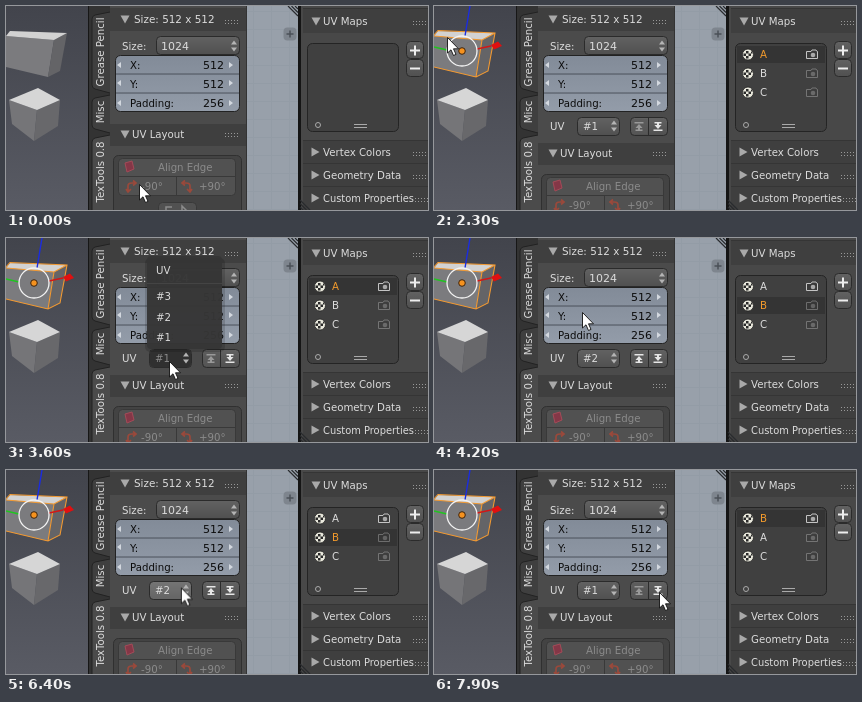
An HTML page for the animation above (8000 ms loop, 422 by 204 pixels).

```html
<!DOCTYPE html>
<html lang="en">
<head>
<meta charset="utf-8">
<title>UV channels</title>
<style>
html, body { margin: 0; width: 100%; height: 100%; overflow: hidden; background: #484848; }
svg { display: block; width: 422px; height: 204px; color: #e6e6e6; }
text { font: 10.2px "DejaVu Sans", sans-serif; fill: #dcdcdc; }
.num { font-size: 11px; }
.ink text { fill: #0c0c0c; }
.dim text { fill: #8b8b8b; }
.active text { fill: #f29a2c; }
.tab { text-anchor: middle; }
.btn { fill: url(#btn); stroke: #2b2b2b; }
.head { fill: #3f3f3f; }

/* every state shares one 8 s clock, 1.25% is 100 ms */
.low, .high, .add, .shift, .one, .two, .three, .before, .after, .popup, .item, .hover, .press {
  animation: 8s step-end infinite;
}
.low, .add { animation-name: low; }
.high { animation-name: high; }
.shift { animation-name: shift; }
.one { animation-name: one; }
.two { animation-name: two; }
.three { animation-name: three; }
.before { animation-name: before; }
.after { animation-name: after; }
.popup { animation-name: popup; }
.item { animation-name: item; }
.hover { animation-name: hover; }
.press { animation-name: press; color: #4a3210; }
.cursor { animation: cursor 8s step-end infinite; }

@keyframes low { 0% { opacity: 0 } 7.5% { opacity: 1 } 28.75%, to { opacity: 0 } }
@keyframes high { 0% { opacity: 0 } 28.75%, to { opacity: 1 } }
@keyframes shift { 0% { transform: translateY(-19px) } 7.5%, to { transform: none } }
@keyframes one { 0% { opacity: 0 } 28.75% { opacity: 1 } 52.5% { opacity: 0 } 92.5%, to { opacity: 1 } }
@keyframes two { 0% { opacity: 0 } 52.5% { opacity: 1 } 67.5% { opacity: 0 } 76.25% { opacity: 1 } 92.5%, to { opacity: 0 } }
@keyframes three { 0% { opacity: 0 } 67.5% { opacity: 1 } 76.25%, to { opacity: 0 } }
@keyframes before { 0% { opacity: 1 } 92.5%, to { opacity: 0 } }
@keyframes after { 0% { opacity: 0 } 92.5%, to { opacity: 1 } }
@keyframes popup { 0% { opacity: 0 } 45% { opacity: 1 } 52.5%, to { opacity: 0 } }
@keyframes item { 0% { opacity: 0 } 48.75% { opacity: 1 } 52.5%, to { opacity: 0 } }
@keyframes hover { 0% { opacity: 0 } 41.25% { opacity: 1 } 52.5% { opacity: 0 } 61.25% { opacity: 1 } 82.5%, to { opacity: 0 } }
@keyframes press { 0% { opacity: 0 } 91.25% { opacity: 1 } 92.5%, to { opacity: 0 } }

@keyframes cursor {
  0% { transform: translate(133px, 178px); animation-timing-function: steps(4, end) }
  5% { transform: translate(60px, 113px); animation-timing-function: steps(2, end) }
  7.5% { transform: translate(44px, 99px) }
  10% { transform: translate(47px, 90px); animation-timing-function: steps(2, end) }
  12.5% { transform: translate(26px, 34px) }
  13.75% { transform: translate(26px, 34px); animation-timing-function: steps(2, end) }
  16.25% { transform: translate(13px, 31px) }
  33.75% { transform: translate(13px, 31px); animation-timing-function: steps(4, end) }
  38.75% { transform: translate(148px, 141px); animation-timing-function: steps(2, end) }
  41.25% { transform: translate(163px, 123px) }
  45% { transform: translate(163px, 123px); animation-timing-function: steps(3, end) }
  48.75% { transform: translate(160px, 80px) }
  50% { transform: translate(160px, 80px); animation-timing-function: steps(2, end) }
  52.5% { transform: translate(148px, 74px) }
  53.75% { transform: translate(119px, 73px) }
  55% { transform: translate(119px, 73px); animation-timing-function: steps(5, end) }
  61.25% { transform: translate(163px, 119px) }
  70% { transform: translate(169px, 121px) }
  71.25% { transform: translate(169px, 121px); animation-timing-function: steps(2, end) }
  73.75% { transform: translate(169px, 117px) }
  78.75% { transform: translate(169px, 117px); animation-timing-function: steps(6, end) }
  86.25% { transform: translate(204px, 120px) }
  92.5% { transform: translate(204px, 120px); animation-timing-function: steps(2, end) }
  95% { transform: translate(229px, 122px) }
  96.25% { transform: translate(229px, 122px); animation-timing-function: steps(2, end) }
  98.75%, to { transform: translate(225px, 122px) }
}
</style>
</head>
<body>
<svg viewBox="0 0 422 204">
  <defs>
    <linearGradient id="view" x2="0" y2="1"><stop stop-color="#42444c"/><stop offset="1" stop-color="#595b64"/></linearGradient>
    <linearGradient id="btn" x2="0" y2="1"><stop stop-color="#626262"/><stop offset="1" stop-color="#505050"/></linearGradient>
    <linearGradient id="field" x2="0" y2="1"><stop stop-color="#828b98"/><stop offset="1" stop-color="#939ca9"/></linearGradient>
    <pattern id="grid" width="18" height="18" patternUnits="userSpaceOnUse" x="247" y="5">
      <path d="M.5 0V18M0 .5H18" stroke="#8b949f"/>
    </pattern>
    <path id="grip" d="M0 .5H13M0 3.5H13" stroke="#999" stroke-dasharray="1 2"/>
    <path id="open" d="M-4.5-3.5H4.5L0 4.5Z" fill="#a9a9a9"/>
    <path id="shut" d="M-3.5-4.5V4.5L4.5 0Z" fill="#a9a9a9"/>
    <path id="pick" d="M-3-1.5H3L0-5.5ZM-3 1.5H3L0 5.5Z" fill="#b4b4b4"/>
    <path id="slide" d="M5-3V3L1 0ZM113-3V3L117 0Z" fill="#d3d8df"/>
    <path id="corner" d="M0 0L10 10M3.5 0L10 6.5M7 0L10 3" stroke="#292b2e" stroke-width="1.2"/>
    <path id="turn" d="M-4 4V-1Q-4-4 0-4H3M1-6.5L4-4L1-1.5M-6 2L-4 5L-1 2" fill="none" stroke="#9a493b" stroke-width="1.7"/>
    <path id="jump" d="M-4.5-4.5H4.5V-3H-4.5ZM-3.5 1.5H3.5L0-2.500ZM-1 1.500H1V3H3.500V4.500H-3.500V3H-1Z" fill="currentColor"/>
    <g id="ball">
      <circle r="5.500" fill="#e9e8dc" stroke="#222" stroke-width=".8"/>
      <path d="M-4.5-1H-2V1.500H-4.500ZM-2-3.500H.5V-1H-2ZM.5-1H3V1.500H.5ZM-2 1.500H.5V4H-2ZM3-3H4.500V-1H3Z" fill="#2a2a2a"/>
    </g>
    <g id="cam">
      <path d="M-5.5-2.5H-1L0-4H4L5-2.500H5.500V4.500H-5.500Z" fill="#3a3a3a" stroke="#c4c4c4"/>
      <circle cx="1" cy="1" r="2.300" fill="#aaa"/>
    </g>
    <g id="ring">
      <circle r="15" fill="none" stroke="#f4f4f4" stroke-width="1.3"/>
      <circle r="3.3" fill="#f5921f" stroke="#3a2310"/>
    </g>
  </defs>

  <!-- 3D view -->
  <path d="M0 0H83V204H0Z" fill="url(#view)"/>
  <path d="M0 30L48 34L42 71L0 61Z" fill="#7b7b7e"/>
  <path d="M48 34L61 27L54 65L42 71Z" fill="#646467"/>
  <path d="M4 25L61 27L48 34L0 30Z" fill="#d2d2d2"/>
  <path d="M3 94L31 104L28 135L6 118Z" fill="#757578"/>
  <path d="M31 104L54 94L52 120L28 135Z" fill="#68686b"/>
  <path d="M3 94L32 82L54 94L31 104Z" fill="#d6d6d6"/>
  <g class="low" fill="none">
    <path d="M3 94L32 82L54 94L52 120L28 135L6 118ZM3 94L31 104L54 94M31 104L28 135" stroke="#efa04a"/>
    <path d="M0 95L12 101" stroke="#20c520" stroke-width="1.4"/>
    <path d="M36 101L56 92" stroke="#d31616" stroke-width="1.4"/>
    <path d="M54 88L66 89L57 96Z" fill="#e01010"/>
    <path d="M28 92L38 38" stroke="#1b2ce0" stroke-width="1.4"/>
    <path d="M33 37L41 17L44 39Q38 42 33 37Z" fill="#1022dc"/>
    <use href="#ring" x="25" y="106"/>
  </g>
  <g class="high" fill="none">
    <path d="M0 29L4 24.500L61 27L54 65L42 71L0 61M0 30L48 34L61 27M48 34L42 71" stroke="#f39a32" stroke-width="1.1"/>
    <path d="M0 41L13 44" stroke="#20c520" stroke-width="1.4"/>
    <path d="M43 43L57 40" stroke="#d31616" stroke-width="1.4"/>
    <path d="M57 39L64 35.500L68 40L60 43.500Z" fill="#e01010"/>
    <path d="M31 30L36 0" stroke="#1b2ce0" stroke-width="1.4"/>
    <use href="#ring" x="28" y="45"/>
  </g>

  <!-- tabs -->
  <path d="M82 0H104V204H82Z" fill="#333"/>
  <path d="M82.500 0V204" stroke="#171717"/>
  <g fill="#3f3f3f" stroke="#222">
    <path d="M104 6L89 9Q86 10 86 13V79Q86 82 89 83L104 87"/>
    <path d="M104 89L89 92Q86 93 86 96V119Q86 122 89 123L104 127"/>
    <path d="M104 129L89 132Q86 133 86 136V205H104" fill="#4b4b4b"/>
  </g>
  <g class="tab">
    <text transform="translate(98 46) rotate(-90)">Grease Pencil</text>
    <text transform="translate(98 106) rotate(-90)">Misc</text>
    <text transform="translate(98 166) rotate(-90)">TexTools 0.8</text>
  </g>

  <!-- tool panel -->
  <path d="M104 0H241V204H104Z" fill="#4b4b4b"/>
  <path class="head" d="M104 2H240V25H104Z"/>
  <use href="#open" x="119" y="13"/>
  <text x="128" y="17" style="font-size:10.4px">Size: 512 x 512</text>
  <use href="#grip" x="219" y="14"/>
  <text x="116" y="44">Size:</text>
  <rect class="btn" x="150.500" y="30.500" width="83" height="18" rx="4"/>
  <text class="num" x="155" y="44">1024</text>
  <use href="#pick" x="228" y="40"/>
  <g class="ink">
    <rect x="109.500" y="49.500" width="124" height="56" rx="5" fill="url(#field)" stroke="#222"/>
    <path d="M110 68H233M110 87H233" stroke="#4a515a"/>
    <use href="#slide" x="110" y="59"/><use href="#slide" x="110" y="77"/><use href="#slide" x="110" y="97"/>
    <text x="124" y="63">X:</text><text class="num" x="197" y="63">512</text>
    <text x="124" y="82">Y:</text><text class="num" x="197" y="82">512</text>
    <text x="124" y="101">Padding:</text><text class="num" x="197" y="101">256</text>
  </g>

  <g class="add">
    <text x="116" y="124">UV</text>
    <rect class="btn" x="145.500" y="111.500" width="88" height="18" rx="4"/>
    <circle cx="155" cy="120" r="6" fill="#383838"/>
    <path d="M151 120.500H160M155.500 116V125" stroke="#eee" stroke-width="2"/>
    <text x="187" y="124">Add</text>
  </g>
  <g class="high">
    <text x="116" y="124">UV</text>
    <rect class="btn" x="143.500" y="111.500" width="42" height="18" rx="4"/>
    <rect class="hover" x="144" y="112" width="41" height="17" rx="4" fill="#fff" fill-opacity=".12"/>
    <use href="#pick" x="180" y="120"/>
    <rect class="btn" x="196.500" y="111.500" width="37" height="18" rx="4"/>
    <path d="M214.500 112V129" stroke="#2b2b2b"/>
    <use href="#jump" x="205" y="120.500"/>
    <use href="#jump" transform="translate(224 120.500) scale(1 -1)"/>
    <g class="press">
      <path d="M200 112H214V129H200Q197 129 197 126V115Q197 112 200 112" fill="#f39b27"/>
      <use href="#jump" x="205" y="120.500"/>
    </g>
  </g>

  <g class="shift">
    <path class="head" d="M104 137H240V159H104Z"/>
    <use href="#open" x="119" y="147"/>
    <text x="126" y="151">UV Layout</text>
    <use href="#grip" x="219" y="146"/>
    <rect x="107.500" y="168.500" width="128" height="80" rx="5" fill="#434343" stroke="#303030"/>
    <g class="dim">
      <rect x="112.500" y="171.500" width="117" height="37" rx="4" fill="#515151" stroke="#393939"/>
      <path d="M112 189.500H230M170.500 190V208" stroke="#393939"/>
      <path d="M119 176L126 174L128 182L121 185Z" fill="#843747" stroke="#a34b58"/>
      <text x="152" y="184">Align Edge</text>
      <use href="#turn" x="126" y="200"/>
      <text x="135" y="203">-90°</text>
      <use href="#turn" transform="translate(180 200) scale(-1 1)"/>
      <text x="193" y="203">+90°</text>
      <rect x="152.500" y="215.500" width="38" height="18" rx="4" fill="#515151" stroke="#393939"/>
      <path d="M160 224V220H166M176 224V219L181 224" fill="none" stroke="#8b8b8b" stroke-width="1.500"/>
    </g>
  </g>

  <!-- image editor -->
  <path d="M241 0H293V204H241Z" fill="#98a0aa"/>
  <path d="M241 0H293V204H241Z" fill="url(#grid)" opacity=".35"/>
  <path d="M240.500 0V204" stroke="#333"/>
  <use href="#corner" x="282"/>
  <rect x="277.500" y="21.500" width="13" height="13" rx="4" fill="#7e858e"/>
  <path d="M280.500 28H287.500M284 24.500V31.500" stroke="#4b5058" stroke-width="1.500"/>

  <!-- properties -->
  <path d="M292 0H422V204H292Z" fill="#484848"/>
  <path d="M293.500 0V204" stroke="#151515" stroke-width="3"/>
  <path class="head" d="M297 3H422V27H297ZM297 135H422V157H297ZM297 158H422V180H297ZM297 181H422V204H297Z"/>
  <path d="M297 2.500H422M297 134.500H422M297 157.500H422M297 180.500H422" stroke="#353535"/>
  <use href="#corner" transform="translate(304 204) rotate(180)"/>
  <use href="#open" x="310" y="15"/>
  <text x="317" y="19">UV Maps</text>
  <use href="#grip" x="407" y="15"/>
  <use href="#shut" x="309" y="146"/><text x="317" y="150">Vertex Colors</text><use href="#grip" x="407" y="146"/>
  <use href="#shut" x="309" y="169"/><text x="317" y="173">Geometry Data</text><use href="#grip" x="407" y="169"/>
  <use href="#shut" x="309" y="192"/><text x="317" y="196" style="font-size:9.900px">Custom Properties</text><use href="#grip" x="409" y="192"/>
  <rect x="301.500" y="37.500" width="91" height="88" rx="5" fill="#404040" stroke="#242424"/>
  <circle cx="312" cy="119" r="2.500" fill="none" stroke="#aaa"/>
  <path d="M348 118.500H361M348 121.500H361" stroke="#aaa"/>
  <rect class="btn" x="400.500" y="35.500" width="17" height="17" rx="4"/>
  <rect class="btn" x="400.500" y="53.500" width="17" height="17" rx="4"/>
  <path d="M404 44.500H414M409 39.500V49.500M404 62.500H414" stroke="#eee" stroke-width="2"/>

  <!-- channel list -->
  <g class="high">
    <text class="before" x="326" y="52">A</text>
    <text class="before" x="326" y="71">B</text><text class="after" x="326" y="71">A</text>
    <text x="326" y="90">C</text>
  </g>
  <g class="active">
    <g class="one">
      <path d="M303 40H391V57H303Z" fill="#343434"/>
      <text class="before" x="326" y="52">A</text><text class="after" x="326" y="52">B</text>
    </g>
    <g class="two">
      <path d="M303 59H391V76H303Z" fill="#343434"/>
      <text x="326" y="71">B</text>
    </g>
    <g class="three">
      <path d="M303 78H391V95H303Z" fill="#343434"/>
      <text x="326" y="90">C</text>
    </g>
  </g>
  <g class="high">
    <use href="#ball" x="314" y="48.500"/><use href="#ball" x="314" y="67.500"/><use href="#ball" x="314" y="86.500"/>
    <use href="#cam" x="378" y="48"/>
    <g opacity=".4"><use href="#cam" x="378" y="67"/><use href="#cam" x="378" y="86"/></g>
  </g>

  <!-- channel number, with the unusable arrow faded -->
  <g class="one">
    <text x="149" y="124">#1</text>
    <path d="M198 113H213V128H198Z" fill="#595959" opacity=".55"/>
  </g>
  <text class="two" x="149" y="124">#2</text>
  <g class="three">
    <text x="149" y="124">#3</text>
    <path d="M216 113H232V128H216Z" fill="#595959" opacity=".55"/>
  </g>

  <g class="popup">
    <rect x="144" y="112" width="41" height="17" rx="3" fill="#303030"/>
    <g class="dim"><text x="149" y="124">#1</text></g>
    <use href="#pick" x="180" y="120"/>
    <rect x="139" y="20" width="80" height="94" rx="5" opacity=".15"/>
    <rect x="141" y="18" width="75" height="93" rx="4" fill="#363636" opacity=".97"/>
    <path d="M141 45.500H216" stroke="#444"/>
    <path class="item" d="M141 69H216V88H141Z" fill="#505050"/>
    <text x="150" y="36">UV</text>
    <text x="150" y="62">#3</text>
    <text x="150" y="83">#2</text>
    <text x="150" y="103">#1</text>
  </g>

  <g class="cursor">
    <path d="M.5.5V16L4 12.800L6.500 18.500L9 17.400L6.500 11.800H11.500Z" fill="#fff" stroke="#111" stroke-width=".9"/>
  </g>
</svg>
</body>
</html>
```
